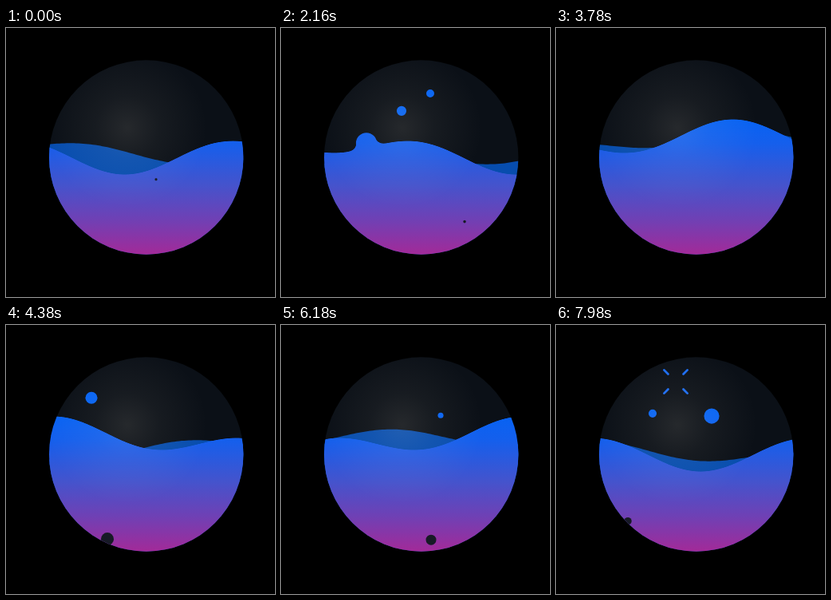
Animation, 337 px wide and 337 px high, one loop 8 s. Source, as an HTML page:

```html
<!DOCTYPE html>
<html lang="en">
<head>
<meta charset="utf-8">
<title>Liquid globe</title>
<style>
html, body { margin: 0; width: 100%; height: 100%; overflow: hidden; background: #000; }
svg { display: block; width: 100%; height: 100%; }
</style>
</head>
<body>
<svg viewBox="0 0 337 337">
  <defs>
    <clipPath id="globe"><circle cx="175.7" cy="162" r="121.7"/></clipPath>
    <linearGradient id="liquid" gradientUnits="userSpaceOnUse" x1="0" y1="110" x2="0" y2="284">
      <stop offset="0" stop-color="#0563f4"/>
      <stop offset=".2" stop-color="#155fec"/>
      <stop offset=".5" stop-color="#4553cc"/>
      <stop offset=".75" stop-color="#7040b4"/>
      <stop offset="1" stop-color="#a32a98"/>
    </linearGradient>
    <radialGradient id="glow" gradientUnits="userSpaceOnUse" cx="152" cy="125" r="100">
      <stop offset="0" stop-color="#fff0d8" stop-opacity=".11"/>
      <stop offset=".4" stop-color="#fff0d8" stop-opacity=".05"/>
      <stop offset="1" stop-color="#fff0d8" stop-opacity="0"/>
    </radialGradient>
    <filter id="goo" filterUnits="userSpaceOnUse" x="-20" y="0" width="377" height="360">
      <feGaussianBlur stdDeviation="6"/>
      <feColorMatrix values="1 0 0 0 0  0 1 0 0 0  0 0 1 0 0  0 0 0 20 -9.5"/>
    </filter>
    <mask id="body" maskUnits="userSpaceOnUse" x="0" y="0" width="337" height="337">
      <g filter="url(#goo)" fill="#fff"><path id="front"/><path id="blobs"/></g>
      <path id="drops" fill="#fff"/>
    </mask>
  </defs>
  <rect width="337" height="337"/>
  <g clip-path="url(#globe)">
    <rect width="337" height="337" fill="#0b1017"/>
    <path id="back" fill="#0767ee" opacity=".7"/>
    <rect width="337" height="337" fill="url(#liquid)" mask="url(#body)"/>
    <path id="rays" fill="none" stroke="#1a6cf4" stroke-width="2.8" stroke-linecap="round"/>
    <path id="holes" fill="#171a26"/>
    <rect width="337" height="337" fill="url(#glow)"/>
  </g>
</svg>
<script>
const LOOP = 8000, CYCLE = 6480, WAVE = 2700, BURST = 200;
const RISE = .265, SHRINK = .0163, SURFACE = 165;
const GLOBE = { x: 175.7, y: 162, r: 121.7 };
const el = Object.fromEntries([...document.querySelectorAll('path')].map(p => [p.id, p]));

// Where each drop bursts: x, y, radius, time
const drops = [
  [208, 72, 1.5, 1240], [150, 71, 4, 1400], [121, 74, 2.8, 1640],
  [195, 64, 6.5, 1690], [187, 61, 3.7, 2240], [151, 67, 3.8, 2300],
  [107, 65, 8.2, 2460], [107, 73, 6.4, 4450], [200, 95, 2.4, 6250]
];
// Where each hole enters at the rim: x, radius, time
const holes = [
  [90, 5, 1485], [230, 3.6, 2050], [164, 7.6, 2875], [127, 8.5, 4351], [188, 7.5, 6120]
];

const since = (t, from) => (t - from + CYCLE) % CYCLE;
const disc = (x, y, r) =>
  `M${x - r} ${y}a${r} ${r} 0 1 0 ${2 * r} 0a${r} ${r} 0 1 0 ${-2 * r} 0z`;

// Short ripples riding on one long swell
function wave(crest, ripples, mid, small, big) {
  let d = 'M-20 360';
  for (let x = -20; x <= 357; x += 3) {
    const a = (x - crest) / (243 * ripples) * 2 * Math.PI;
    d += `L${x} ${(mid - small * Math.cos(ripples * a) - big * Math.cos(a)).toFixed(2)}`;
  }
  return d + 'L357 360z';
}

function drop([x, y, r, end], t) {
  const left = since(end, t);
  return left < (SURFACE - y) / RISE ? disc(x, y + RISE * left, r + SHRINK * left) : '';
}

function hole([x, r, start], t) {
  const age = since(t, start);
  if (age >= r / SHRINK) return '';
  const rim = GLOBE.y + Math.sqrt(GLOBE.r ** 2 - (x - GLOBE.x) ** 2);
  return disc(x, rim + .3 * r - RISE * age, r - SHRINK * age);
}

function burst([x, y, , end], t) {
  const p = since(t, end) / BURST;
  if (p >= 1) return '';
  const mid = 8 + 18 * p, half = 3.6 * Math.sqrt(1 - Math.abs(2 * p - 1));
  const a = (mid - half) * Math.SQRT1_2, b = (mid + half) * Math.SQRT1_2;
  let d = '';
  for (const sx of [-1, 1]) for (const sy of [-1, 1])
    d += `M${x + sx * a} ${y + sy * a}L${x + sx * b} ${y + sy * b}`;
  return d;
}

function draw(now) {
  const t = now % LOOP, s = t % CYCLE, turn = t / WAVE;
  const set = (id, d) => el[id].setAttribute('d', d);
  const all = (list, shape) => list.map(item => shape(item, s)).join('');
  set('front', wave(513.5 - 729 * turn, 3, 149, 16, 18.7));
  set('back', wave(-143 + 972 * turn, 4, 152.6, 7.4, 14.5));
  set('blobs', all(drops, drop));
  set('drops', all(drops, drop));
  set('holes', all(holes, hole));
  set('rays', all(drops, burst));
}

const start = performance.now();
function tick() {
  draw(performance.now() - start);
  requestAnimationFrame(tick);
}
tick();
</script>
</body>
</html>
```
